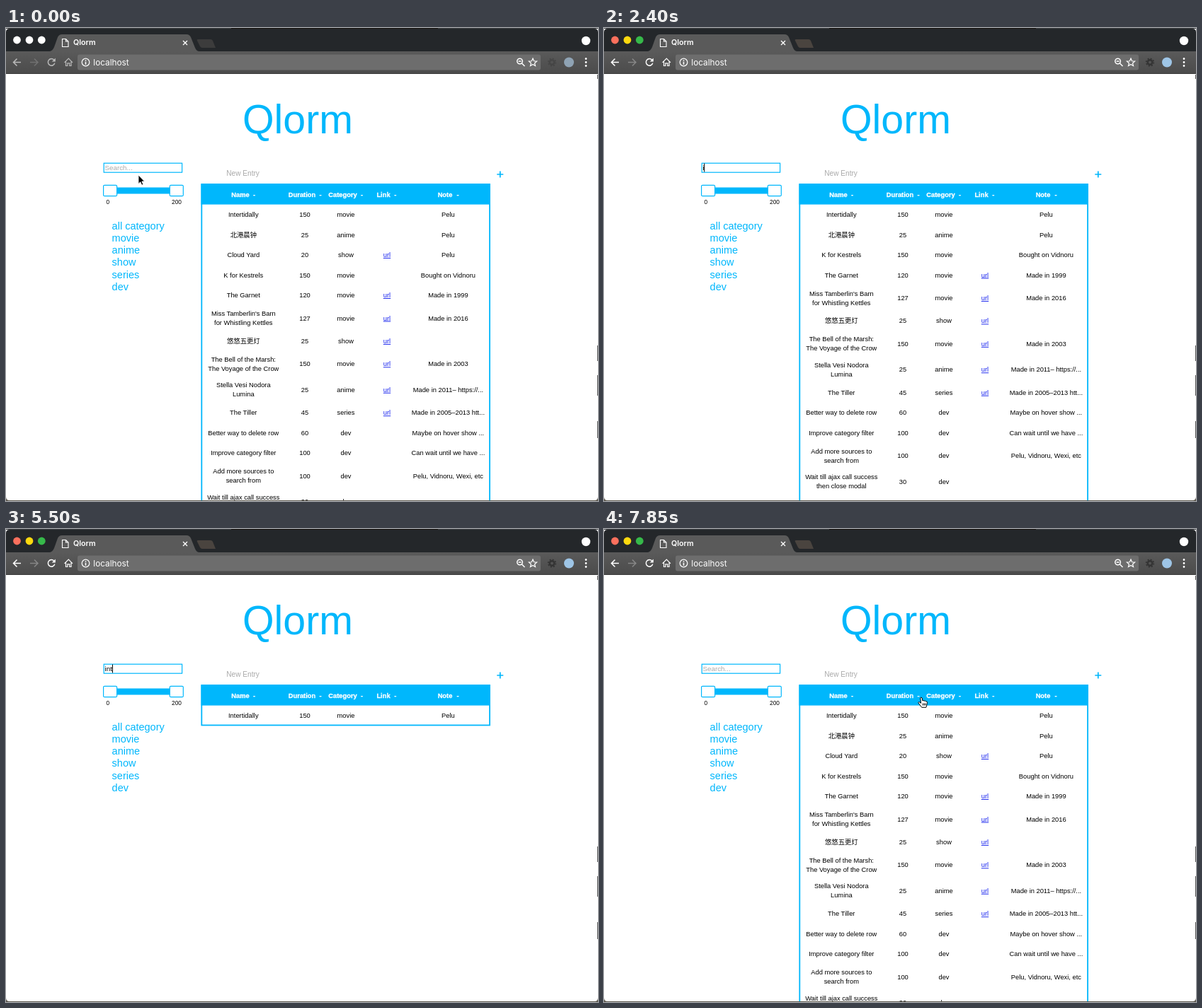
An HTML page that plays this animation: 836x669 px, repeating every 8 s.

```html
<!DOCTYPE html>
<html lang="en">
<head>
<meta charset="utf-8">
<title>Qlorm</title>
<style>
  html, body { margin: 0; width: 100%; height: 100%; overflow: hidden; background: #fff; }
  svg { display: block; width: 836px; height: 669px; font-family: "Liberation Sans", "Noto Sans CJK SC", "Noto Sans CJK", Arial, sans-serif; }
  .ui { font-family: Inter, Roboto, sans-serif; fill: #fff; }
  .accent { fill: #00b7fc; }
  .line { fill: none; stroke: #fff; stroke-width: 1.5; }
  .cell { font-size: 9.33px; text-anchor: middle; }
  .head { font-size: 9.33px; font-weight: bold; text-anchor: middle; fill: #fff; stroke: #fff; stroke-width: .3; }
  .url { fill: #1420ee; text-decoration: underline; }
  .menu { font-size: 14.5px; }
  .hint { fill: #a9a9a9; }
  .inactive .light { fill: #fff; }
  .inactive .nav { opacity: .6; }
  .inactive .newtab { fill: #3c3c3c; }
  .inactive .gear { opacity: .4; }
  .inactive .badge { fill: #8fa3b4; }
</style>
</head>
<body>
<svg id="stage" viewBox="0 0 836 669">
  <defs>
    <linearGradient id="bar" x2="0" y2="1"><stop stop-color="#5a5a5a"/><stop offset="1" stop-color="#4b4b4b"/></linearGradient>
    <clipPath id="page"><path d="M0 65H835V663Q835 668 830 668H5Q0 668 0 663Z"/></clipPath>
  </defs>

  <!-- desktop and window -->
  <rect width="836" height="669" fill="#5e5a50"/>
  <path d="M0 1H836V663Q836 668 831 668H5Q0 668 0 663Z" fill="#fff"/>
  <path d="M835.5 66V72M835.5 449V471M835.5 491V520M835.5 556V580" stroke="#555"/>
  <path d="M0 33V6Q0 1 5 1H831Q836 1 836 6V33Z" fill="#24272a"/>
  <path d="M0 .5H836" stroke="#3b3d40"/><path d="M318 .5H610" stroke="#17130f"/>

  <!-- browser -->
  <g id="browser">
    <g class="lights">
      <circle class="light" cx="15.5" cy="17" r="5.4" fill="#fc705d"/>
      <circle class="light" cx="33" cy="17" r="5.4" fill="#fdd90f"/>
      <circle class="light" cx="50.3" cy="17" r="5.4" fill="#36b94a"/>
    </g>
    <path d="M62 33Q66 32 68 27L73 13Q75 9 79 9H255Q259 9 261 13L267 28Q269 33 273 33Z" fill="#5a5a5a"/>
    <path class="newtab" d="M271 16H289Q291 16 292 18L296 28H277Q275 28 274 26L270 18Q269 16 271 16Z" fill="#4a443f"/>
    <rect y="33" width="836" height="32" fill="url(#bar)"/>
    <path d="M0 64.5H836" stroke="#393939"/>
    <path class="line" stroke-width="1" d="M79.5 15.5H84.5L88 19V26.5H79.5ZM84.5 15.5V19H88" style="stroke-width:1.1"/>
    <text class="ui" x="95" y="24.3" font-size="10.7" font-weight="600">Qlorm</text>
    <path class="line" d="M250 18L256 24M256 18L250 24" style="stroke-width:1.3"/>
    <circle cx="819" cy="18" r="6.2" fill="#fff"/>
    <rect x="101" y="37.5" width="654" height="22" rx="3" fill="#6d6d6d"/>
    <g class="nav">
      <path class="line" d="M21 48.5H10.5M15.5 43.5L10.5 48.5L15.5 53.5"/>
      <path class="line" d="M34 48.5H45M40 43.5L45 48.5L40 53.5" opacity=".3"/>
      <path class="line" d="M67.8 45.2A4.8 4.8 0 1 0 68.8 49.6"/><path d="M69.8 42.5V47.5H64.8Z" fill="#fff"/>
      <path class="line" d="M82.5 48.8L88.3 43L94 48.8M84.5 47.5V53.5H86.8V49.8H89.8V53.5H92V47.5" style="stroke-width:1.2"/>
    </g>
    <circle class="line" cx="112.5" cy="48.5" r="5.3" style="stroke-width:1.2"/>
    <path class="line" d="M112.5 45.2V46.7M112.5 47.8V51.8"/>
    <text class="ui" x="123.3" y="53" font-size="11.8">localhost</text>
    <circle class="line" cx="725.6" cy="47" r="3.8"/><path class="line" d="M728.5 50L732.5 54M723.6 47H727.6"/>
    <path class="line" d="M744 43L745.6 46.8L749.6 47.1L746.5 49.7L747.5 53.6L744 51.5L740.5 53.6L741.5 49.7L738.4 47.1L742.4 46.8Z" style="stroke-width:1.2"/>
    <g class="gear" fill="none" stroke="#343434">
      <circle cx="771" cy="48.5" r="3.3" stroke-width="2.4"/>
      <circle cx="771" cy="48.5" r="5.3" stroke-width="1.6" stroke-dasharray="2.08"/>
    </g>
    <circle class="badge" cx="795" cy="48.5" r="7" fill="#9ec5e6"/>
    <path d="M819 43.5h.01M819 48.5h.01M819 53.5h.01" stroke="#fff" stroke-width="2.8" stroke-linecap="round"/>
  </g>

  <!-- page -->
  <g clip-path="url(#page)">
    <text class="accent" x="412" y="149" font-size="57.3" text-anchor="middle">Qlorm</text>

    <rect x="138.2" y="191.2" width="110.4" height="13" fill="#fff" stroke="#00b7fc" stroke-width="1.2"/>
    <text id="query" x="139.5" y="201.4" font-size="9.8"></text>
    <path id="caret" d="M0 191.5V203.5" stroke="#000"/>

    <rect class="accent" x="147" y="225.5" width="94" height="9"/>
    <g fill="#fff" stroke="#00b7fc" stroke-width="1.2">
      <rect x="137.6" y="222.3" width="19" height="15.4" rx="1.5"/>
      <rect x="231.3" y="222.3" width="19" height="15.4" rx="1.5"/>
    </g>
    <g font-size="8.3" text-anchor="middle"><text x="143.7" y="249.3">0</text><text x="241" y="249.3">200</text></g>
    <g id="menu" class="accent menu"></g>

    <text class="hint" x="311.3" y="209" font-size="10.1">New Entry</text>
    <path d="M693.3 207H702.3M697.8 202.5V211.5" stroke="#00b7fc" stroke-width="1.7"/>
    <g id="rows"></g>
    <rect class="accent" x="275.5" y="220.3" width="408.5" height="29.3"/>
    <g id="heads"></g>
    <rect id="frame" x="276.3" y="221" width="406.8" fill="none" stroke="#00b7fc" stroke-width="1.8"/>
  </g>

  <!-- pointer shapes -->
  <g id="pointer">
    <path id="arrow" d="M0 0V12.4L2.8 9.8L4.8 14.2L6.8 13.3L4.9 9H8.6Z" stroke="#fff" stroke-width=".8"/>
    <g id="beam" fill="none">
      <path d="M-2.8 -6.5Q0 -6.5 0 -5Q0 -6.5 2.8 -6.5M0 -5V5M-2.8 6.5Q0 6.5 0 5Q0 6.5 2.8 6.5M-1.5 1.5H1.5" stroke="#000" stroke-width="1.3"/>
    </g>
    <path id="hand" d="M-1.3 1Q0 -1 1.2 1L1.9 5Q3.2 3.8 4.2 5.2Q5.6 4.5 6.4 5.8Q8.3 5.3 8.5 7.4L7.8 11.2L6.9 14.3H.7L-1.8 11L-4.2 7.7Q-3.8 5.9 -2 7L-.4 8.5ZM2.4 8.5V11.5M4.3 8.5V11.5M6.1 8.5V11.5" fill="#fff" stroke="#000" stroke-width="1"/>
  </g>
</svg>
<script>
const LOOP = 8000, HEAD_BOTTOM = 249.7, LINE = 13;
const $ = id => document.getElementById(id);
const text = (cls, x, y, s) => `<text class="${cls}" x="${x}" y="${y}">${s}</text>`;

// depth: the longest query that still keeps the row
const row = (name, minutes, kind, link, note, depth = 1) =>
  ({ lines: name.split('|'), minutes, kind, link, note, depth });
const entries = [
  row('Intertidally', 150, 'movie', 0, 'Pelu', 3),
  row('北港晨钟', 25, 'anime', 0, 'Pelu'),
  row('Cloud Yard', 20, 'show', 1, 'Pelu', 0),
  row('K for Kestrels', 150, 'movie', 0, 'Bought on Vidnoru'),
  row('The Garnet', 120, 'movie', 1, 'Made in 1999', 2),
  row("Miss Tamberlin's Barn|for Whistling Kettles", 127, 'movie', 1, 'Made in 2016', 2),
  row('悠悠五更灯', 25, 'show', 1, ''),
  row('The Bell of the Marsh:|The Voyage of the Crow', 150, 'movie', 1, 'Made in 2003', 2),
  row('Stella Vesi Nodora|Lumina', 25, 'anime', 1, 'Made in 2011– https://...', 2),
  row('The Tiller', 45, 'series', 1, 'Made in 2005–2013 htt...', 2),
  row('Better way to delete row', 60, 'dev', 0, 'Maybe on hover show ...'),
  row('Improve category filter', 100, 'dev', 0, 'Can wait until we have ...'),
  row('Add more sources to|search from', 100, 'dev', 0, 'Pelu, Vidnoru, Wexi, etc'),
  row('Wait till ajax call success|then close modal', 30, 'dev', 0, '')
];
const rowHeight = r => r.lines.length > 1 ? 36.4 : 28.5;

$('menu').innerHTML = ['all category', 'movie', 'anime', 'show', 'series', 'dev']
  .map((s, i) => text('', 149.6, 285 + i * 17.15, s)).join('');
$('heads').innerHTML = [['Name', 331, 350.5], ['Duration', 418, 444], ['Category', 475.5, 502.5], ['Link', 533, 549.7], ['Note', 620, 638]]
  .map(([s, x, dash]) => text('head', x, 238.6, s) + text('head', dash, 238.6, '-')).join('');

// [time, search text]
const typing = [[0, ''], [2400, 'i'], [2650, 'in'], [3000, 'int'], [5750, 'in'], [5900, 'i'], [6150, '']];
const caretOn = [[1700, 3500], [4000, 4500], [5000, 6650], [7150, 7500]];
const pointerOff = [[2400, 3450], [5500, 6550]];
// [start, end, steps, x, y]
const moves = [[50, 550, 5, 184, 198], [3450, 4350, 6, 398, 270], [4850, 5150, 3, 190, 199],
  [6550, 7500, 7, 426, 224], [7650, 7850, 3, 448, 238]];

const within = (spans, t) => spans.some(([a, b]) => t >= a && t < b);
const show = (id, on) => $(id).setAttribute('visibility', on ? 'visible' : 'hidden');

function pointerAt(t) {
  let x = 187, y = 208;
  for (const [start, end, steps, toX, toY] of moves) {
    if (t < start) break;
    const done = Math.min(steps, 1 + Math.floor((t - start) / (end - start) * (steps - 1)));
    const p = done / steps, ease = p * p * (3 - 2 * p);
    x += (toX - x) * ease;
    y += (toY - y) * ease;
  }
  return [x, y];
}

function drawRows(depth, hoverY) {
  let top = HEAD_BOTTOM, html = '';
  for (const r of entries.filter(r => r.depth >= depth)) {
    const h = rowHeight(r), base = top + h / 2 + 3.1;
    if (hoverY >= top && hoverY < top + h)
      html += `<rect x="276" y="${top}" width="407" height="${h}" fill="#fff200"/>`;
    r.lines.forEach((s, i) => html += text('cell', 335.3, base + (i - (r.lines.length - 1) / 2) * LINE, s));
    html += text('cell', 422, base, r.minutes) + text('cell', 480, base, r.kind) + text('cell', 624.4, base, r.note);
    if (r.link) html += text('cell url', 538, base, 'url');
    top += h;
  }
  $('rows').innerHTML = html;
  $('frame').setAttribute('height', (depth < 2 ? 700 : top - 0.7) - 221);
}

let lastKey;
function render(t) {
  const query = typing.filter(k => k[0] <= t).pop()[1];
  const [x, y] = pointerAt(t), visible = !within(pointerOff, t);
  const overTable = x > 276 && x < 684 && y > 220;
  const overInput = x > 138 && x < 249 && y > 191 && y < 205;
  const hoverY = visible && overTable ? y : -1;

  const key = query + hoverY;
  if (key !== lastKey) {
    lastKey = key;
    drawRows(query.length, hoverY);
    $('query').textContent = query || 'Search...';
    $('query').setAttribute('class', query ? '' : 'hint');
  }
  $('browser').setAttribute('class', t < 50 ? 'inactive' : '');
  show('caret', within(caretOn, t));
  $('caret').setAttribute('transform', `translate(${[140, 141.7, 147.2, 150.5][query.length]})`);
  $('pointer').setAttribute('transform', `translate(${x} ${y})`);
  show('arrow', visible && !overTable && !overInput);
  show('beam', visible && overInput);
  show('hand', visible && overTable);
}

const begin = performance.now();
function tick() {
  render((performance.now() - begin) % LOOP);
  requestAnimationFrame(tick);
}
tick();
</script>
</body>
</html>
```
